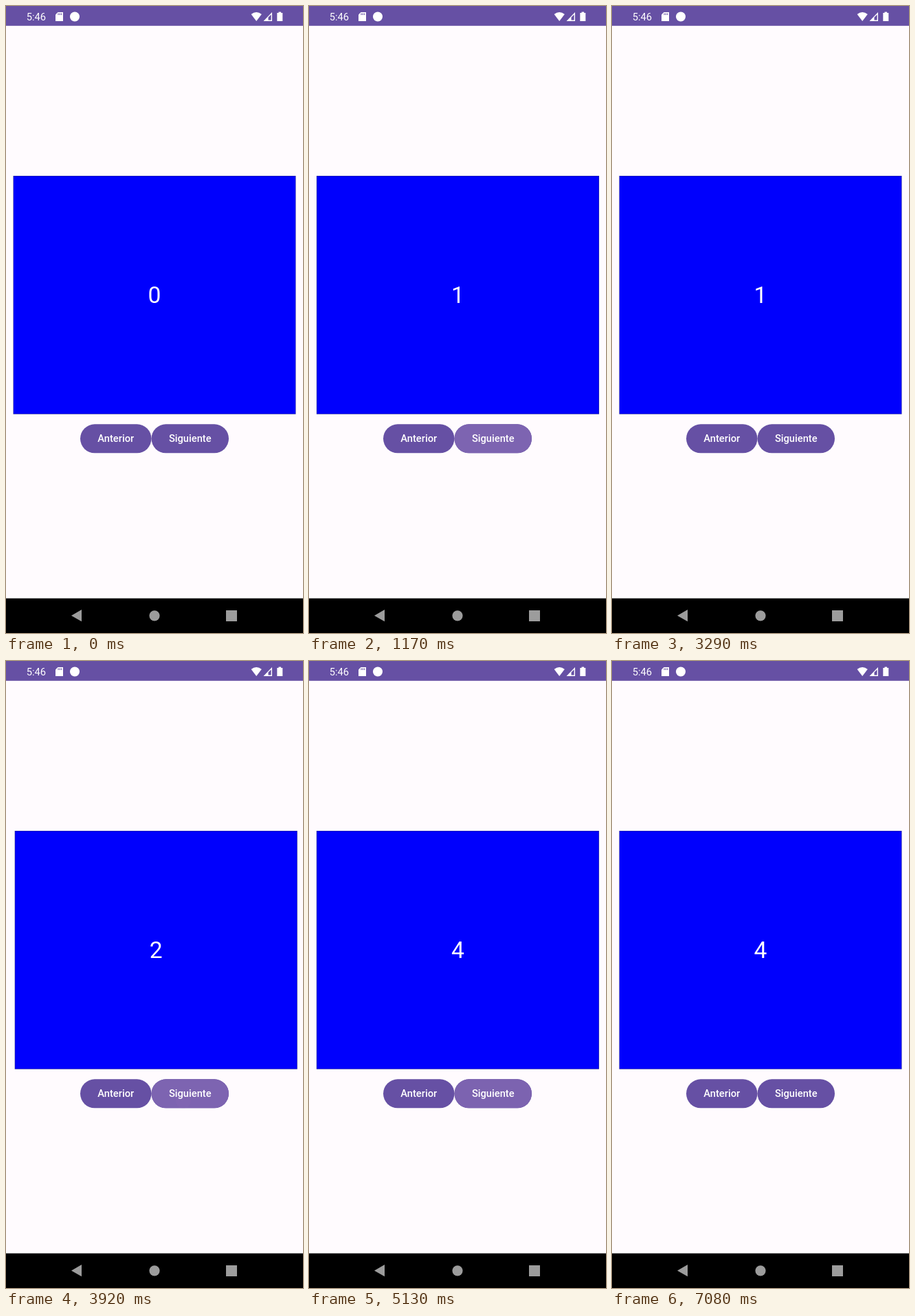
An HTML page with a canvas for the animation above (7210 ms loop, 432 by 912 pixels).

```html
<!DOCTYPE html>
<html lang="es">
<head>
<meta charset="utf-8">
<title>Paginador</title>
<style>
  html, body { margin: 0; width: 100%; height: 100%; overflow: hidden; background: #fffbfe; }
  canvas { display: block; }
</style>
</head>
<body>
<canvas id="stage" width="432" height="912"></canvas>
<script>
const ctx = document.getElementById('stage').getContext('2d');
const WIDTH = 432, HEIGHT = 912, LOOP = 7210;
const SPRING = Math.sqrt(1500) / 1000; // critically damped, per ms

const PURPLE = '#6650a4', PRESSED = '#7d64b1', TOUCH = '#8b68b2';
const WHITE = '#fff', PAPER = '#fffbfe', GRAY = '#9c9c9c';
const BLUE = '#0000fd', BLUE_EDGE = '#2a2a98';

const buttons = {
  prev: { label: 'Anterior', x: 108, w: 103.5, touch: [160, 636] },
  next: { label: 'Siguiente', x: 211.5, w: 112.5, touch: [258, 640] }
};
const BUTTON_Y = 608.3, BUTTON_H = 42;

const taps = [
  { at: 935, button: 'next', page: 1 },
  { at: 1890, button: 'next', page: 2 },
  { at: 2850, button: 'prev', page: 1 },
  { at: 3730, button: 'next', page: 2 },
  { at: 4280, button: 'next', page: 3 },
  { at: 4890, button: 'next', page: 4 },
  { at: 5560, button: 'next', page: 4 }
];

const clamp = v => Math.max(0, Math.min(1, v));

function scrollAt(time) {
  let page = 0;
  for (const tap of taps) {
    if (time < tap.at) break;
    const phase = SPRING * (time - tap.at);
    page = tap.page + (page - tap.page) * (1 + phase) * Math.exp(-phase);
  }
  return page;
}

function fillPath(color, points) {
  ctx.fillStyle = color;
  ctx.beginPath();
  points.forEach(([x, y]) => ctx.lineTo(x, y));
  ctx.closePath();
  ctx.fill();
}

function disc(color, x, y, r) {
  ctx.fillStyle = color;
  ctx.beginPath();
  ctx.arc(x, y, r, 0, Math.PI * 2);
  ctx.fill();
}

function rect(color, x, y, w, h) {
  ctx.fillStyle = color;
  ctx.fillRect(x, y, w, h);
}

function text(value, x, y, font, align = 'left') {
  ctx.fillStyle = WHITE;
  ctx.font = `${font} Roboto, sans-serif`;
  ctx.textAlign = align;
  ctx.fillText(value, x, y);
}

function drawStatusBar() {
  rect(PURPLE, 0, 0, WIDTH, 28.8);
  text('5:46', 29.7, 21, '400 14.7px');

  // memory card
  fillPath(WHITE, [[75.5, 9], [83, 9], [83, 22], [72, 22], [72, 12.5]]);
  for (let i = 0; i < 3; i++) rect(PURPLE, 75.5 + i * 2.3, 10.5, 1.1, 2.6);

  disc(WHITE, 100, 15.5, 7);

  // wifi
  ctx.fillStyle = WHITE;
  ctx.beginPath();
  ctx.moveTo(364.2, 22);
  ctx.lineTo(356.6, 12);
  ctx.quadraticCurveTo(364.2, 6, 371.8, 12);
  ctx.fill();

  // mobile signal
  fillPath(WHITE, [[387, 9], [387, 22], [374.5, 22]]);
  fillPath(PURPLE, [[385.6, 12.5], [385.6, 20.6], [381.5, 20.6], [381.5, 16.5]]);

  // battery
  rect(WHITE, 394.3, 10, 8, 12);
  rect(WHITE, 396.5, 8.6, 3.6, 2);
}

function drawNavigation() {
  rect('#000', 0, 861.6, WIDTH, HEIGHT - 861.6);
  fillPath(GRAY, [[95, 886.7], [110, 878], [110, 895.3]]);
  disc(GRAY, 216, 886.8, 7.6);
  rect(GRAY, 320, 879, 16, 16);
}

function drawPager(scroll) {
  for (let page = Math.floor(scroll); page <= Math.ceil(scroll); page++) {
    const x = (page - scroll) * WIDTH;
    rect(BLUE_EDGE, x + 10.5, 247, 411, 346.7);
    rect(BLUE, x + 11.1, 247.6, 409.8, 345.5);
    text(page, x + 216, 431.8, '400 33.6px', 'center');
  }
}

function drawRipple(button, age) {
  const fade = (1 - clamp((age - 240) / 200)) ** 2;
  const grow = clamp((age + 70) / 200);
  const [x, y] = button.touch;
  ctx.save();
  ctx.clip();
  ctx.globalAlpha = fade;
  disc(PRESSED, x, y, 8 + 80 * grow);
  ctx.globalAlpha = 0.6 * clamp((235 - age) / 100);
  disc(TOUCH, x, y, 11);
  ctx.restore();
}

function drawButton(name, time) {
  const button = buttons[name];
  ctx.fillStyle = PURPLE;
  ctx.beginPath();
  ctx.roundRect(button.x, BUTTON_Y, button.w, BUTTON_H, BUTTON_H / 2);
  ctx.fill();
  const tap = taps.find(t => t.button === name && time > t.at - 70 && time < t.at + 440);
  if (tap) drawRipple(button, time - tap.at);
  text(button.label, button.x + button.w / 2, 634.3, '500 14.7px', 'center');
}

function draw(time) {
  rect(PAPER, 0, 0, WIDTH, HEIGHT);
  drawPager(scrollAt(time));
  drawButton('prev', time);
  drawButton('next', time);
  drawStatusBar();
  drawNavigation();
}

const start = performance.now();
function tick() {
  draw((performance.now() - start) % LOOP);
  requestAnimationFrame(tick);
}
tick();
</script>
</body>
</html>
```
